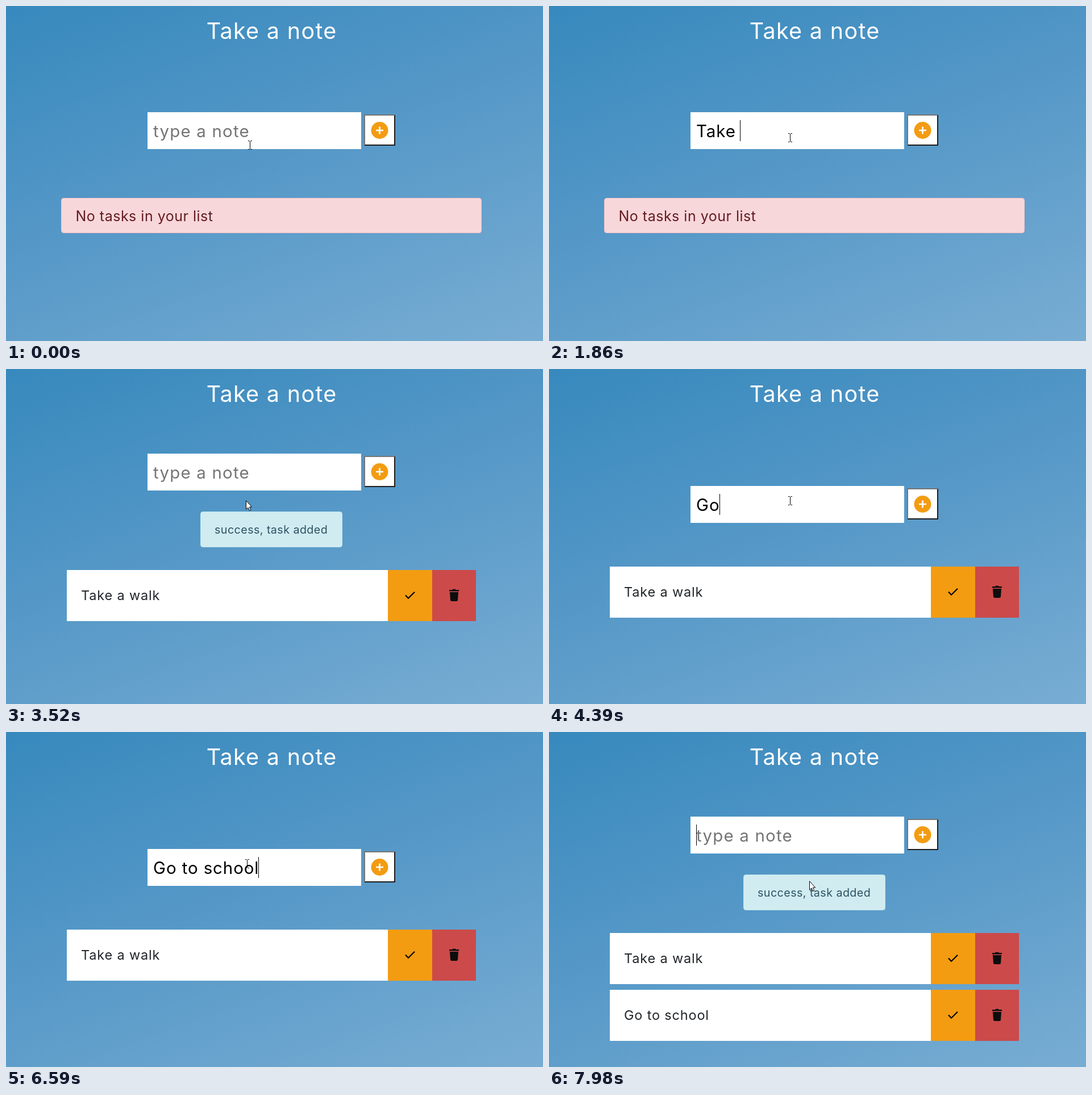
An HTML page for the animation above (8000 ms loop, 945 px wide and 590 px high).

```html
<!DOCTYPE html>
<html lang="en">
<head>
<meta charset="utf-8">
<title>Take a note</title>
<style>
  html, body { margin: 0; width: 100%; height: 100%; overflow: hidden; }
  body { background: linear-gradient(160deg, #3789bd, #5799c8 50%, #78add3); }
  svg { display: block; width: 945px; height: 590px; }
  text {
    font-family: Inter, "Open Sans", sans-serif;
    font-optical-sizing: none;
    white-space: pre;
  }
  .title { font-size: 39.5px; letter-spacing: .033em; fill: #fff; }
  .field { font-size: 29.5px; letter-spacing: .03em; fill: #000; }
  .field.hint { letter-spacing: .04em; fill: #757575; }
  .empty { font-size: 25px; letter-spacing: .02em; fill: #641c22; }
  .done { font-size: 19.7px; letter-spacing: .022em; fill: #2b5263; }
  .item { font-size: 23.5px; letter-spacing: .035em; fill: #212529; }
</style>
</head>
<body>
<svg viewBox="0 0 945 590">
  <defs>
    <g id="row">
      <rect width="565" height="90" fill="#fff"/>
      <rect x="565" width="78" height="90" fill="#f39c12"/>
      <rect x="643" width="77" height="90" fill="#cc4a4a"/>
      <path d="M596 44.5l5 5.2 11-11" fill="none" stroke="#000" stroke-width="2.2"/>
      <path d="M673 35h5l1.2-1.2h4.6l1.2 1.2h5v2.4h-17zM674 39h15l-1 14q-.2 2-2.2 2h-8.600q-2 0-2.200-2z" fill="#0d0d0d"/>
    </g>
  </defs>

  <text class="title" x="467.600" y="58" text-anchor="middle">Take a note</text>

  <g id="form">
    <rect x="249" width="376" height="65" fill="#fff"/>
    <rect x="630" y="4" width="55" height="55" fill="#fff"/>
    <path d="M630 59V4h55l-2 2h-51v51z" fill="#767676"/>
    <path d="M685 4v55h-55l2-2h51V6z" fill="#1c1c1c"/>
    <circle cx="657.500" cy="32" r="15" fill="#f39c12"/>
    <path d="M651 32h13M657.500 25.500v13" stroke="#fff" stroke-width="2.700"/>
    <text id="typed" class="field" x="259" y="43.500"></text>
    <rect id="caret" y="14" width="1" height="37"/>
  </g>

  <g id="emptyBox">
    <rect x="97.500" y="338.500" width="739" height="61" rx="4" fill="#f8d7da" stroke="#f5c2c7"/>
    <text class="empty" x="122.500" y="378.500">No tasks in your list</text>
  </g>

  <g id="doneBox">
    <rect x="342.500" y="251.500" width="249" height="62" rx="4" fill="#d1ecf1" stroke="#bee5eb"/>
    <text class="done" x="367" y="290">success, task added</text>
  </g>

  <g id="list">
    <g>
      <use href="#row"/>
      <text class="item" x="25" y="53">Take a walk</text>
    </g>
    <g id="second" transform="translate(0 100)">
      <use href="#row"/>
      <text class="item" x="25" y="53">Go to school</text>
    </g>
  </g>

  <g id="pointer">
    <path id="beam" d="M-3 -7.500h2.500M1.500 -7.500h2.500M.5 -7v14M-3 7.500h2.500M1.500 7.500h2.500" fill="none" stroke="#000"/>
    <path id="arrow" d="M.5 .8v15.400l3.500-3.300 2.400 5.500 2.400-1-2.400-5.400h4.300z" fill="#fff" stroke="#000"/>
  </g>
</svg>

<script>
const LOOP = 8000;
const $ = id => document.getElementById(id);

const views = {
  empty: { form: 187, list: null, done: false },
  added: { form: 149, list: 354, done: true },
  plain: { form: 206, list: 348, done: false }
};

const type = (text, caret) => ({ text, caret, blink: true });
const on = { blink: true }, off = { blink: false };
const point = (x, y, arrow = false) => ({ x, y, arrow });
const submitted = { view: 'added', text: '', caret: 259, blink: false };

const steps = [
  [0, { view: 'empty', text: '', caret: 259, blink: false, rows: 0, ...point(429, 245) }],
  [60, point(427, 239)],
  [130, { ...on, ...point(424, 232) }],
  [660, off],
  [930, type('T', 276)],
  [1330, type('Ta', 292)],
  [1530, type('Tak', 310)],
  [1660, type('Take', 328)],
  [1860, type('Take ', 336)],
  [1990, type('Take a', 353)],
  [2120, type('Take a ', 361)],
  [2320, type('Take a w', 388)],
  [2520, type('Take a wa', 405)],
  [2650, type('Take a wal', 413)],
  [2790, type('Take a walk', 431)],
  [3320, off],
  [3390, { ...submitted, rows: 1 }],
  [3460, point(422, 231, true)],
  [3720, type('G', 282)],
  [4260, off],
  [4320, { view: 'plain', ...point(424, 232) }],
  [4390, type('Go', 300)],
  [4850, off],
  [4990, type('Go ', 308)],
  [5050, type('Go t', 320)],
  [5190, type('Go to', 339)],
  [5320, type('Go to ', 347)],
  [5590, type('Go to s', 361)],
  [5920, type('Go to sc', 379)],
  [6050, type('Go to sch', 398)],
  [6250, type('Go to scho', 417)],
  [6390, type('Go to schoo', 436)],
  [6590, type('Go to school', 444)],
  [7050, off],
  [7120, { ...submitted, rows: 2 }],
  [7190, point(422, 231, true)],
  [7580, on],
  [7910, point(407, 240, true)],
  [7980, point(458, 262, true)]
];

const show = (id, visible) => $(id).style.display = visible ? '' : 'none';
const move = (id, x, y) => $(id).setAttribute('transform', `translate(${x} ${y})`);

function render(s) {
  const v = views[s.view];
  move('form', 0, v.form);
  move('list', 107, v.list || 0);
  show('list', s.rows > 0);
  show('second', s.rows > 1);
  show('emptyBox', s.rows === 0);
  show('doneBox', v.done);

  $('typed').textContent = s.text || 'type a note';
  $('typed').classList.toggle('hint', !s.text);
  $('caret').setAttribute('x', s.caret);
  show('caret', s.blink);

  move('pointer', s.x, s.y);
  show('arrow', s.arrow);
  show('beam', !s.arrow);
}

let shown = -1;
function tick() {
  const t = performance.now() % LOOP;
  const past = steps.filter(([at]) => at <= t);
  if (past.length !== shown) {
    shown = past.length;
    render(Object.assign({}, ...past.map(([, change]) => change)));
  }
  requestAnimationFrame(tick);
}
tick();
</script>
</body>
</html>
```
